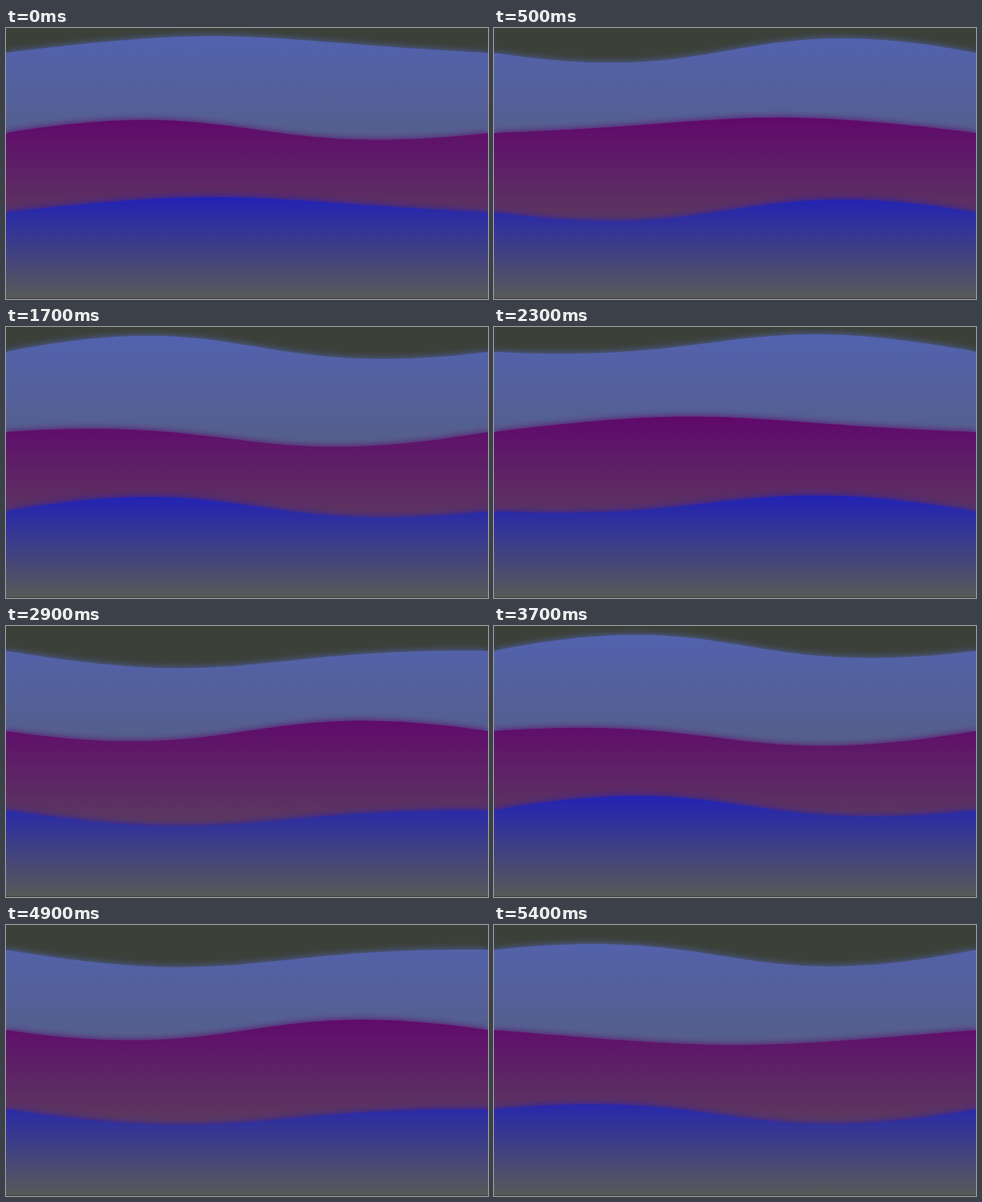
An HTML page with a canvas for the animation above (5500 ms loop, 600x338 px).

```html
<!DOCTYPE html>
<html>
<head>
<meta charset="utf-8">
<title>Waves</title>
<style>
  html, body { margin: 0; width: 100%; height: 100%; overflow: hidden; background: #3b4038; }
  canvas { display: block; width: 100vw; height: 100vh; }
</style>
</head>
<body>
<canvas id="stage" width="600" height="338"></canvas>
<script>
const W = 600, FLOOR = 337, LOOP = 5500, STEP = 100, PERIOD = 2000;
const RAD = Math.PI / 180;
const ctx = document.getElementById('stage').getContext('2d');

// sway: common part of both control points; tilt: opposed part
const waves = [
  { y: 31, phase: -102, sway: 27.2, tilt: 53.5, color: 'rgb(82,98,174)' },
  { y: 131, phase: -162, sway: 25, tilt: 44.5, color: 'rgb(96,8,108)' },
  { y: 230, phase: -102, sway: 25, tilt: 47.5, color: 'rgb(33,33,182)' }
];

for (const wave of waves) {
  wave.fill = ctx.createLinearGradient(0, wave.y - 21, 0, FLOOR);
  wave.fill.addColorStop(0, wave.color);
  wave.fill.addColorStop(1, 'rgb(88,90,88)');
}

function drawWave({ y, phase, sway, tilt, color, fill }, degrees) {
  const angle = (degrees + phase) * RAD;
  const both = sway * Math.sin(angle);
  const apart = tilt * Math.cos(angle);
  ctx.fillStyle = fill;
  ctx.shadowColor = color;
  ctx.beginPath();
  ctx.moveTo(0, y);
  ctx.bezierCurveTo(W / 2, y + both + apart, W / 2, y + both - apart, W, y);
  ctx.lineTo(W, FLOOR);
  ctx.lineTo(0, FLOOR);
  ctx.fill();
}

function draw(now) {
  const time = Math.floor((now % LOOP) / STEP) * STEP;
  ctx.shadowBlur = 0;
  ctx.fillStyle = '#3b4038';
  ctx.fillRect(0, 0, W, 338);
  ctx.shadowBlur = 10;
  for (const wave of waves) drawWave(wave, time / PERIOD * 360);
  ctx.shadowBlur = 0;
  ctx.fillStyle = '#3d3e3c';
  ctx.fillRect(0, FLOOR, W, 1);
}

const start = performance.now();
function tick() {
  draw(performance.now() - start);
  requestAnimationFrame(tick);
}
tick();
</script>
</body>
</html>
```
